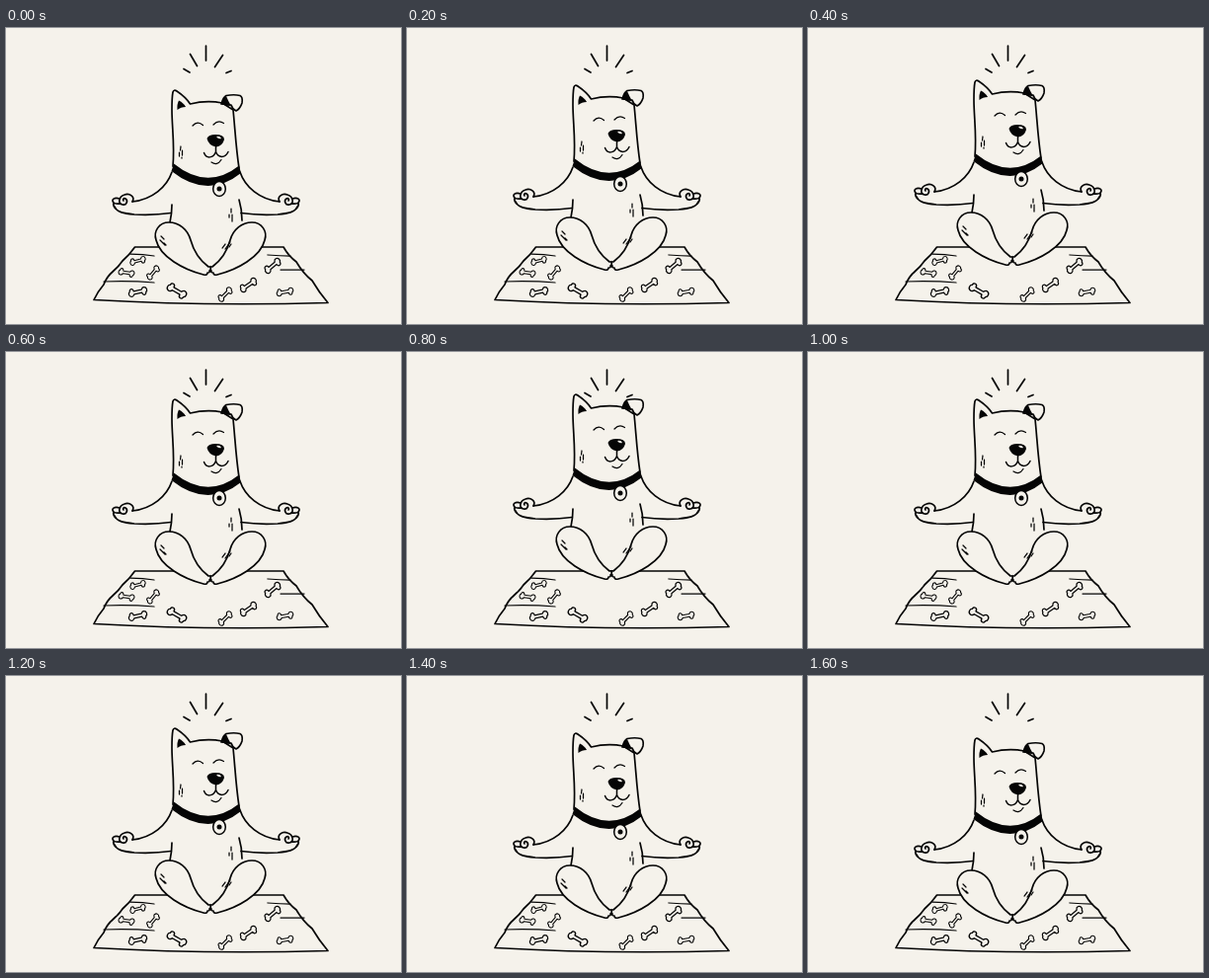
An HTML page without scripts for the animation above (1.8 s loop, 400 by 300 pixels).

```html
<!DOCTYPE html>
<html lang="en">
<head>
<meta charset="utf-8">
<title>Levitating dog</title>
<style>
  html, body { margin: 0; width: 100%; height: 100%; overflow: hidden; background: #f5f2eb; }
  svg { display: block; width: 100%; height: 100%; }
  .ink { fill: none; stroke: #050505; stroke-width: 1.7; stroke-linecap: round; stroke-linejoin: round; }
  .paper { fill: #f5f2eb; }
  .solid { fill: #050505; }
  .fine { stroke-width: 1.25; }
  .bare { stroke: none; }
</style>
</head>
<body>
<svg viewBox="0 0 400 300">
  <defs>
    <path id="bone" d="M-4-1.5C-4-5-8-5-8-1.8C-10-1-10 3-7 3.5C-5 4-4.500 2-4 1.500H4C4 5 8 5 8 1.800C10 1 10-3 7-3.500C5-4 4.500-2 4-1.500Z"/>
    <g id="arm">
      <path d="M168 146C163 161 148 174 128 176M110 181C112 187 120 188 130 189Q150 190 167 187.500"/>
      <path d="M128 176C131 171 125 167 120 169C114 171 113 178 118 179C122 180 124 175 121 173C119 172 118 174 119 175"/>
      <path d="M115 173C110 171 106 174 109 177C111 179 114 178 116 178M109 177Q108 180 111 183"/>
    </g>
    <path id="leg" class="paper" d="M205 242C197 236 190 226 187 215C184 204 175 197 165 197C155 197 149 206 152 215C156 232 180 245 200 250Q204 251 204 248Q207 248 206 246Q208 245 207 242Z"/>
  </defs>

  <g class="ink">
    <path id="rays" d="M180 41.500L186 45M186.500 26.500L193.500 38.500M202.500 18V33M219.500 27.500L211.500 39.500M228 43.500L223 45.500"/>

    <g id="mat">
      <path class="paper" d="M130.500 222H281Q286 231 294 237Q301 249 310 256Q317 268 326 278.500Q200 282 89 275.500Q93 267 99 260Q102 252 108 247Q114 242 118 236Q125 230 130.500 222Z"/>
      <path class="fine" d="M126 229Q139 229 150 231M99 257Q126 256 150 258M265 230Q278 231 288 231M278 245H302"/>
      <g class="paper fine">
        <use href="#bone" transform="translate(133.500 236) rotate(-15) scale(.85)"/>
        <use href="#bone" transform="translate(122 248) rotate(10) scale(.85)"/>
        <use href="#bone" transform="translate(149 248) rotate(-50) scale(.85)"/>
        <use href="#bone" transform="translate(133.500 267.500) rotate(-12)"/>
        <use href="#bone" transform="translate(173 266.500) rotate(30) scale(1.1)"/>
        <use href="#bone" transform="translate(222 270) rotate(-45) scale(.9)"/>
        <use href="#bone" transform="translate(245.500 260.500) rotate(-35)"/>
        <use href="#bone" transform="translate(270 241) rotate(-40)"/>
        <use href="#bone" transform="translate(282.500 267.500) rotate(-10) scale(.9)"/>
      </g>
    </g>

    <g id="dog">
      <animateTransform attributeName="transform" type="translate" calcMode="discrete" dur="1.8s" repeatCount="indefinite"
        values="0 0;0 -5;0 -10;0 -15;0 -20;0 -15;0 -10;0 -5;0 0"/>

      <path class="paper bare" d="M168 146C163 161 148 174 128 176L111 183Q130 191 167 188V198L200 240H214L239 196V188Q275 191 294 183L277 176C257 174 242 161 237 146Z"/>
      <use href="#arm"/>
      <use href="#arm" transform="matrix(-1 0 0 1 405 0)"/>
      <path d="M168 179Q168 188 166 197M236 174Q239 184 239 195"/>
      <path class="fine" d="M226 189V192M228 183V187M229 189V196"/>

      <g id="legs">
        <use href="#leg" transform="matrix(-1 0 0 1 414 0)"/>
        <use href="#leg"/>
        <path class="fine" d="M157 211L160 214M156 215L161 220M160 218L162 220M219 223L222 219M222 224L227 217M226 222L228 219"/>
      </g>

      <g id="head">
        <path class="paper" d="M169 140C171 120 168 100 168 83Q168 70 169 65Q170 62 173 64Q182 70 186.500 77Q203 73 219 76L230 83C232 103 233 123 236 142Q204 168 169 140Z"/>
        <path class="solid bare" d="M173.500 83Q173 77 175 73.500Q180 76 182 80Q177 80 173.500 83Z"/>
        <path class="paper" d="M218 77Q220 70 223 68.500Q231 67 237 68.500Q240 70 239 76Q237 82 233 84Q229 82 228 78Z"/>
        <path class="solid bare" d="M218 77Q220 70 223 69Q225 74 228 79Q222 79 218 77Z"/>
        <path class="fine" d="M189 99Q194 93.500 199.500 98.500M210 98Q215 92.500 220.500 96.500"/>
        <path class="solid bare" d="M203.500 112Q205 108 212 108Q221 108 221 113Q219 120 213 120.500Q205 119 203.500 112Z"/>
        <path class="paper bare" d="M213 110Q217 109 218 112Q215 113 213 110Z"/>
        <path d="M212.500 120V125.500M200.500 126.500C203 133 210 132 212.500 125.500C215 132 222 132 225 125.500" stroke-width="1.5"/>
        <path class="fine" d="M208 136Q214 140 218 133.500M177 120L176.500 124M178.500 124V129M175.500 126V130M178 131V132"/>
      </g>

      <g id="collar">
        <path class="solid bare" d="M170 137.500Q204 165 236 139.500L238 147Q204 174 167.500 145Z"/>
        <ellipse class="paper" cx="216" cy="163" rx="6.300" ry="7.500" stroke-width="1.5"/>
        <circle class="solid bare" cx="216" cy="163" r="2.500"/>
      </g>
    </g>
  </g>
</svg>
</body>
</html>
```
